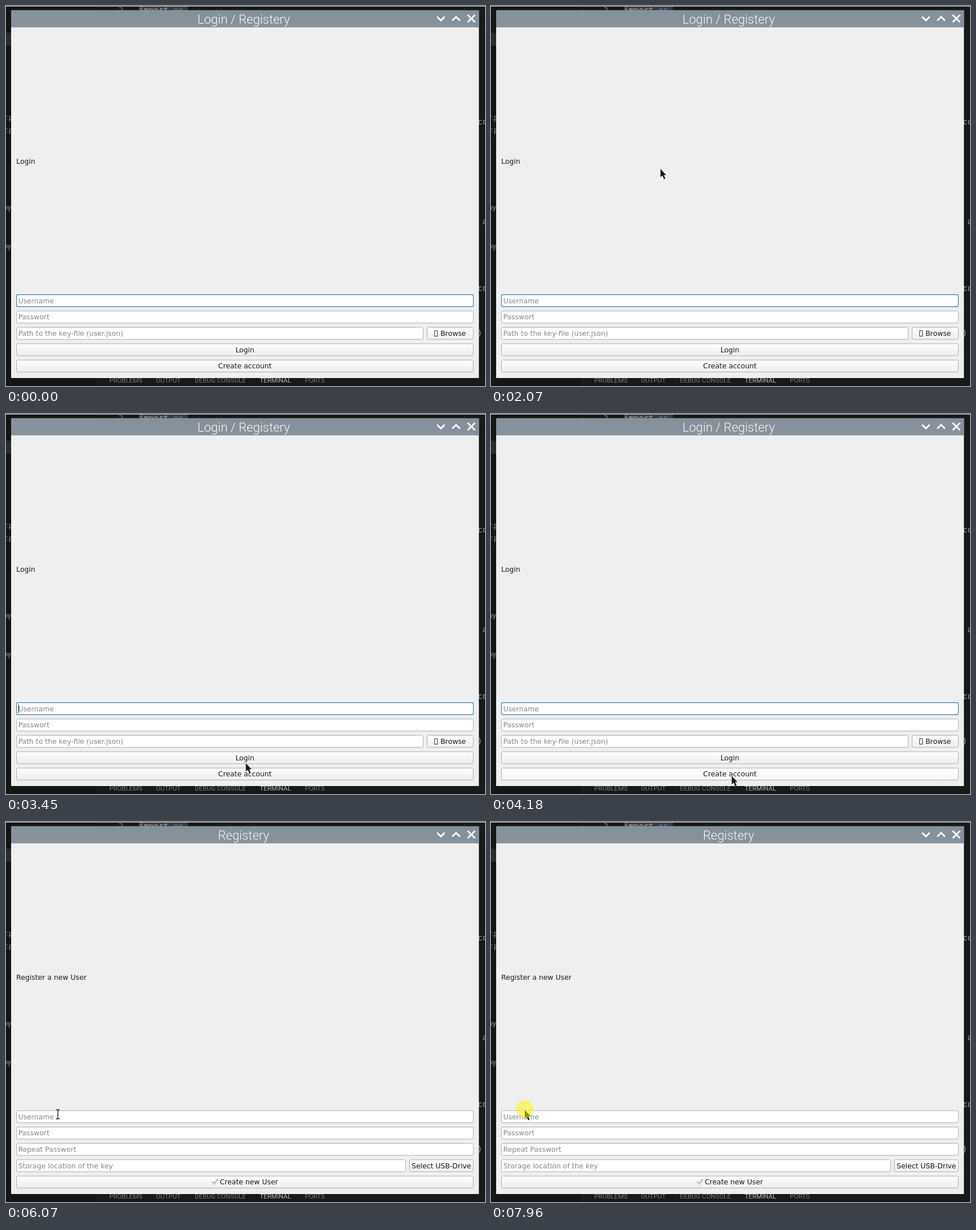
Animation of 840x667 px, one loop 8 s. Source, as an HTML page:

```html
<!DOCTYPE html>
<html lang="en">
<head>
<meta charset="utf-8">
<title>Login / Registery</title>
<style>
html, body { margin: 0; width: 100%; height: 100%; overflow: hidden; background: #171919; }
svg { display: block; width: 840px; height: 667px; }
text { white-space: pre; }
.ui { font: 12.3px "DejaVu Sans", sans-serif; fill: #1b1b1b; }
.hint { fill: #888; }
.mid { text-anchor: middle; }
.title { font: 300 21.9px Roboto, sans-serif; fill: #f4f5f6; text-anchor: middle; }
.side { font: 13px Roboto, sans-serif; fill: #8c8c8c; }
.tab { font: 11.4px Roboto, sans-serif; fill: #787878; }
.tab.on { fill: #b4b4b4; }
.code { font: 14.4px "DejaVu Sans Mono", monospace; fill: #a0a2a2; }
.dim { fill: #777; }
.blue { fill: #4787a5; }
.field { fill: #fff; stroke: #b1b1b1; }
.button { fill: url(#face); stroke: #b1b1b1; }
.button.hover { fill: url(#lit); }
.button.down { fill: #dbdbdb; }
.field.focus { stroke: #3b7cad; stroke-width: 1.2; }
</style>
</head>
<body>
<svg viewBox="0 0 840 667">
  <defs>
    <linearGradient id="face" x2="0" y2="1"><stop stop-color="#fdfdfd"/><stop offset="1" stop-color="#eeeeee"/></linearGradient>
    <linearGradient id="lit" x2="0" y2="1"><stop stop-color="#ffffff"/><stop offset="1" stop-color="#f7f7f7"/></linearGradient>
  </defs>
  <g id="desk">
    <rect width="840" height="667" fill="#181a1a"/>
    <rect width="160" height="667" fill="#141515"/>
    <rect x="160" width="1" height="667" fill="#282a2a"/>
    <rect width="840" height="1" fill="#c4c4c4"/>
    <rect y="47" width="9" height="23" fill="#2a2c30"/>
    <rect x="233" y="1" width="86" height="8" fill="#383b3e"/>
  </g>
  <rect x="9" y="7.7" width="820.3" height="645.3" fill="#efefef"/>
  <rect x="9" y="7.7" width="820.3" height="29.8" fill="#87919b"/>
  <path d="M756 18.8l6.6 6.6 6.6-6.6M782.7 25.6l6.6-6.6 6.6 6.6M809.5 15.5l13 13M822.5 15.5l-13 13" fill="none" stroke="#fff" stroke-width="2.8"/>
  <g id="login"></g>
  <g id="register"></g>
  <rect id="caret" x="21.5" y="510" width="1.1" height="15" fill="#111"/>
  <path id="arrow" d="M0 0V15.6L3.6 12.3 6.2 18.8 9 17.6 6.4 11.4H10.6Z" fill="#17171c" stroke="#fff" stroke-opacity=".6" stroke-width=".7"/>
  <path id="beam" d="M-3.2-8.3Q0-8.3 0-6.5Q0-8.3 3.2-8.3M0-7V7M-3.2 8.3Q0 8.3 0 6.5Q0 8.3 3.2 8.3" fill="none" stroke="#222" stroke-width="1.4"/>
  <circle id="halo" r="15.3" fill="#fdf800" fill-opacity=".52"/>
</svg>
<script>
const LOOP = 8000;
const $ = id => document.getElementById(id);
const row = i => 517.2 + 28.7 * i;

function add(parent, tag, attrs, text) {
  const el = document.createElementNS("http://www.w3.org/2000/svg", tag);
  for (const k in attrs) el.setAttribute(k, attrs[k]);
  if (text) el.textContent = text;
  $(parent).append(el);
  return el;
}
const label = (parent, cls, x, y, text) => add(parent, "text", { class: cls, x, y }, text);
const box = (parent, cls, left, right, i) => add(parent, "rect", {
  class: cls, x: left + .5, y: row(i) - 10.5, width: right - left - 1, height: 21, rx: 2.2
});

const fields = { login: [], register: [] };
function field(page, i, hint, right = 820) {
  const el = box(page, "field", 18, right, i);
  label(page, "ui hint", 21.4, row(i) + 4.4, hint);
  fields[page].push({ y: row(i), right });
  return el;
}
function button(page, i, text, left = 18, shift = 0) {
  const el = box(page, "button", left, 820, i);
  label(page, "ui mid", (left + 820) / 2 + shift, row(i) + 4.4, text);
  return el;
}

// Editor showing around the window
label("desk", "code dim", 197, 12, "2");
label("desk", "code", 233, 11.5, "import");
label("desk", "code blue", 293.6, 11.5, "os");
for (const y of [199.5, 222]) label("desk", "side", -2, y, "r.py");
for (const y of [357.5, 425.5]) label("desk", "side", -4.5, y, "py");
for (const y of [207.5, 499.5]) label("desk", "code", 827, y, "co");
label("desk", "code", 835.5, 383, "a");
label("desk", "code", 826.5, 579, ")");
label("desk", "tab", 181, 661.2, "PROBLEMS");
label("desk", "tab", 263, 661.2, "OUTPUT");
label("desk", "tab", 331, 661.2, "DEBUG CONSOLE");
label("desk", "tab on", 445, 661.2, "TERMINAL");
label("desk", "tab", 524, 661.2, "PORTS");

label("login", "title", 416.8, 31, "Login / Registery");
label("login", "ui", 18, 277, "Login");
const userField = field("login", 0, "Username");
field("login", 1, "Passwort");
field("login", 2, "Path to the key-file (user.json)", 732);
button("login", 2, "Browse", 738, 5.3);
add("login", "rect", { x: 751.7, y: 570, width: 5, height: 9.6, fill: "none", stroke: "#222", "stroke-width": .9 });
button("login", 3, "Login");
const createButton = button("login", 4, "Create account");

label("register", "title", 416.6, 31, "Registery");
label("register", "ui", 18, 277, "Register a new User");
field("register", 0, "Username");
field("register", 1, "Passwort");
field("register", 2, "Repeat Passwort");
field("register", 3, "Storage location of the key", 701);
button("register", 3, "Select USB-Drive", 707);
const newButton = button("register", 4, "Create new User", 18, 7);
add("register", "path", { d: "M361.4 632.6l1.6-1.2 1.8 2.4 5.6-6.6 1 .6-6.4 8.6z", fill: "#fff", stroke: "#666", "stroke-width": .7 });

// Pointer strokes: start, end, x, y reached
const ENTRY = [800, 570];
const STROKES = [
  [320, 660, 406, 293],
  [850, 1000, 411, 294],
  [1200, 1330, 360, 337],
  [1400, 1730, 318, 328],
  [1930, 2300, 276, 243],
  [2370, 2690, 341, 345],
  [2750, 3030, 330, 585],
  [3240, 3600, 452, 622],
  [3670, 3840, 431, 636],
  [3980, 4180, 422, 635],
  [4250, 4390, 429, 632],
  [5720, 6070, 91, 513],
  [6140, 6490, 54, 331],
  [6560, 6780, 143, 302],
  [6850, 7030, 117, 289],
  [7420, 7960, 59, 505]
];
const JUMP = 68;
const BLINK = 519, FIRST_BLINK = 110;
const PRESS = 5050, RELEASE = 5180, SWITCH = 5250, TAP = 7955;

const ease = u => u * u * (3 - 2 * u);

// The pointer advances in jumps and reaches each goal on the last one.
function pointer(t) {
  let from = ENTRY, at = null;
  for (const [start, end, ...goal] of STROKES) {
    if (t < start) break;
    const last = Math.round((end - start) / JUMP);
    const jump = Math.min(last, Math.floor((t - start) / (end - start) * last + .1));
    const u = ease((jump + 1) / (last + 1));
    at = from.map((v, k) => v + (goal[k] - v) * u);
    from = goal;
  }
  return at;
}

const overField = ([x, y], page) =>
  fields[page].some(f => x > 18 && x < f.right && Math.abs(y - f.y) < 10.8);
const show = (el, on) => { el.style.display = on ? "" : "none"; };
const place = (el, x, y) => el.setAttribute("transform", `translate(${x} ${y})`);

function draw(t) {
  const page = t < SWITCH ? "login" : "register";
  const down = t >= PRESS && t < RELEASE;
  const blink = Math.floor((t - FIRST_BLINK) / BLINK);
  show($("login"), page === "login");
  show($("register"), page === "register");
  show($("caret"), t < PRESS && blink >= 0 && blink % 2 === 0);
  userField.classList.toggle("focus", t < PRESS);

  const p = pointer(t);
  const hover = !!p && Math.abs(p[1] - row(4)) < 11;
  createButton.classList.toggle("hover", hover);
  newButton.classList.toggle("hover", hover);
  createButton.classList.toggle("down", down);

  const beam = !!p && overField(p, page);
  show($("arrow"), p && !beam);
  show($("beam"), beam);
  show($("halo"), down || t >= TAP);
  if (p) {
    place($("arrow"), ...p);
    place($("beam"), ...p);
    place($("halo"), p[0] - .5, p[1] - 1);
  }
}

const begin = performance.now();
function tick() {
  draw((performance.now() - begin) % LOOP);
  requestAnimationFrame(tick);
}
tick();
</script>
</body>
</html>
```
